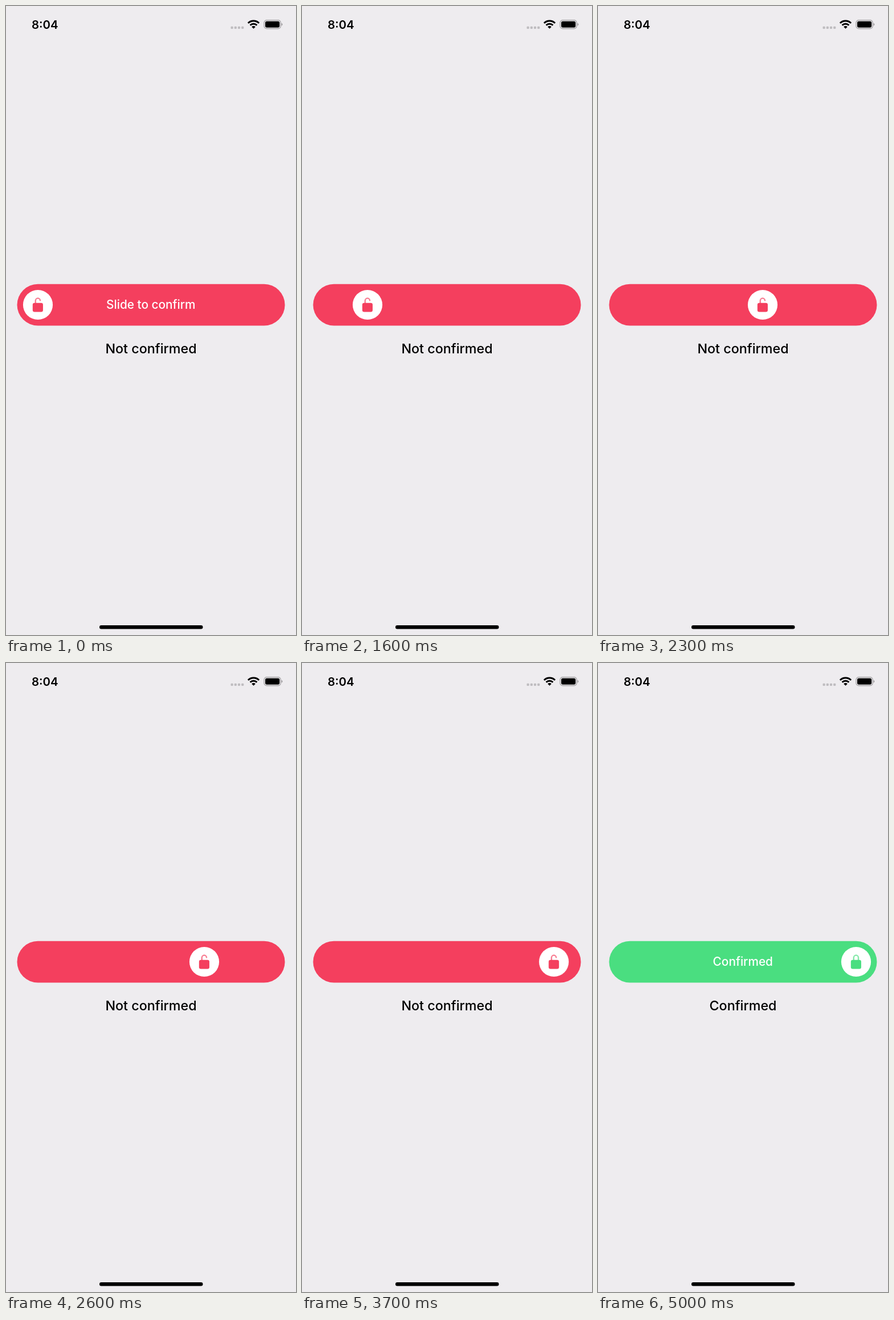
Animation, 509 px wide and 1101 px high, one loop 6.1 s. Source, as an HTML page:

```html
<!DOCTYPE html>
<html lang="en">
<head>
<meta charset="utf-8">
<title>Slide to confirm</title>
<style>
  html, body { margin: 0; width: 100%; height: 100%; overflow: hidden; background: #eeecef; }
  svg { display: block; width: 100%; height: 100%; }
  text { font-family: Inter, Roboto, sans-serif; font-weight: 500; }
  .mid { text-anchor: middle; }
  .hint { font-size: 20.8px; fill: #fff; }
  .label { font-size: 23.3px; }
  .clock { font-size: 20.4px; font-weight: 600; }

  .slider, .knob, .idle, .open, .done { animation: 6100ms step-end -4ms infinite; }
  .slider { animation-name: tint; }
  .knob { animation-name: drag; }
  .idle { animation-name: idle; }
  .open { animation-name: open; }
  .done { animation-name: done; }

  @keyframes tint { 0% { color: #f43f5e } 81.9672%, 100% { color: #4ade80 } }
  @keyframes idle { 0% { opacity: 1 } 16.3934%, 100% { opacity: 0 } }
  @keyframes open { 0% { opacity: 1 } 81.9672%, 100% { opacity: 0 } }
  @keyframes done { 0% { opacity: 0 } 81.9672%, 100% { opacity: 1 } }

  /* The finger moves in 100 ms steps, slowing near the end of the track. */
  @keyframes drag {
    0%       { transform: translateX(0) }
    16.3934% { transform: translateX(0);       animation-timing-function: steps(2, jump-start) }
    19.6721% { transform: translateX(8px);     animation-timing-function: steps(3, jump-start) }
    24.5902% { transform: translateX(42px);    animation-timing-function: steps(2, jump-start) }
    27.8689% { transform: translateX(59px) }
    29.5082% { transform: translateX(59px);    animation-timing-function: steps(2, jump-start) }
    32.7869% { transform: translateX(85px);    animation-timing-function: steps(3, jump-start) }
    37.7049% { transform: translateX(200px);   animation-timing-function: steps(1, jump-start) }
    39.3443% { transform: translateX(233px);   animation-timing-function: steps(3, jump-start) }
    44.2623% { transform: translateX(292px);   animation-timing-function: steps(5, jump-start) }
    52.4590% { transform: translateX(342px);   animation-timing-function: steps(2, jump-start) }
    55.7377% { transform: translateX(358.5px); animation-timing-function: steps(5, jump-start) }
    63.9344% { transform: translateX(393px);   animation-timing-function: steps(4, jump-start) }
    70.4918%, 100% { transform: translateX(397px) }
  }
</style>
</head>
<body>
<svg viewBox="0 0 509 1101">
  <!-- Status bar -->
  <text class="clock" x="45" y="39.7">8:04</text>
  <g fill="#bfbdc0">
    <rect x="394.5" y="35.7" width="4.2" height="4.2" rx="1.2"/>
    <rect x="400.7" y="35.7" width="4.2" height="4.2" rx="1.2"/>
    <rect x="406.9" y="35.7" width="4.2" height="4.2" rx="1.2"/>
    <rect x="413.1" y="35.7" width="4.2" height="4.2" rx="1.2"/>
  </g>
  <g fill="none" stroke="#000" stroke-width="3">
    <path d="M424.9 30a13.6 13.6 0 0 1 19.2 0"/>
    <path d="M428.6 33.7a8.4 8.4 0 0 1 11.8 0"/>
    <path d="M431.2 36.4a4.6 4.6 0 0 1 6.6 0l-3.3 3.3z" fill="#000" stroke="none"/>
  </g>
  <rect x="453.1" y="24.8" width="29" height="14.8" rx="4.4" fill="none" stroke="#979598" stroke-width="1.2"/>
  <rect x="455" y="26.7" width="25.2" height="11" rx="2.7"/>
  <path d="M483.6 29.8q1.7.7 1.7 2.5t-1.7 2.5z" fill="#979598"/>

  <!-- Slider -->
  <g class="slider">
    <rect x="19.5" y="486.8" width="470" height="72.7" rx="36.35" fill="currentColor"/>
    <text class="hint mid idle" x="254.3" y="530">Slide to confirm</text>
    <text class="hint mid done" x="254.3" y="530">Confirmed</text>
    <g class="knob">
      <circle cx="56" cy="523" r="26.1" fill="#fff"/>
      <g transform="translate(42.7 509.9) scale(.0515)" fill="none" stroke="currentColor" stroke-width="32" stroke-linecap="round">
        <rect x="80" y="192" width="352" height="304" rx="64" fill="currentColor" stroke="none"/>
        <path class="open" d="M176 208V112a80 80 0 0 1 160 0"/>
        <path class="done" d="M176 208V112a80 80 0 0 1 160 0V208"/>
      </g>
    </g>
  </g>

  <text class="label mid open" x="254.5" y="608.4">Not confirmed</text>
  <text class="label mid done" x="254.5" y="608.4">Confirmed</text>

  <!-- Home indicator -->
  <rect x="164" y="1084" width="181.5" height="6.4" rx="3.2"/>
</svg>
</body>
</html>
```
